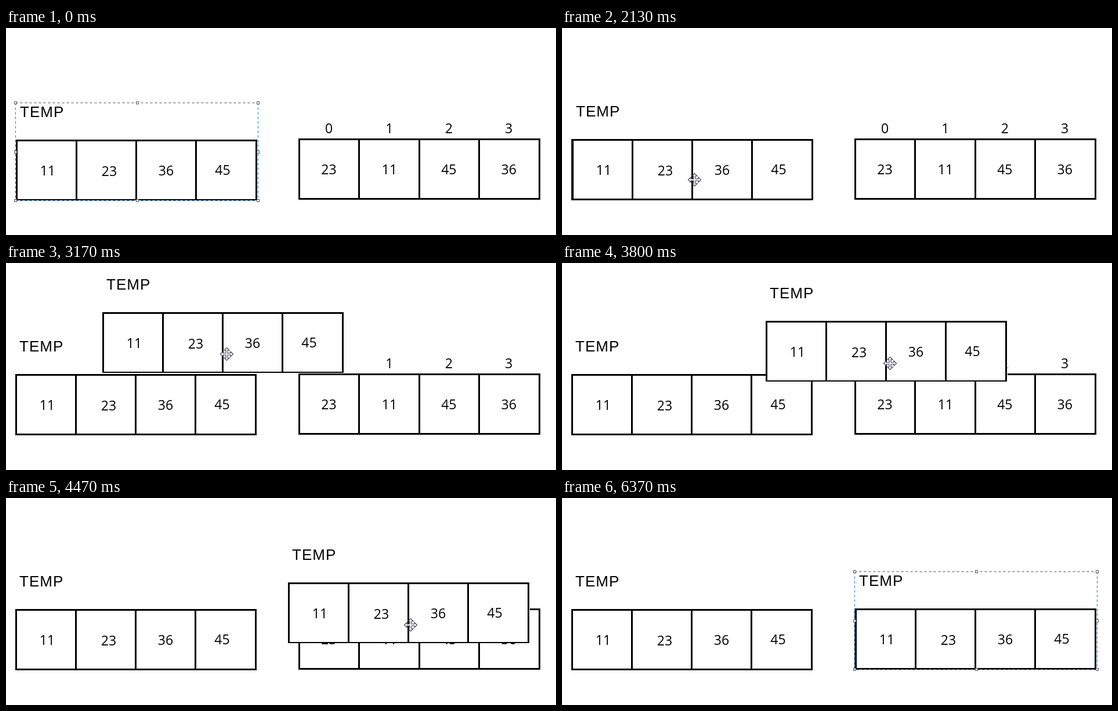
An HTML page with a canvas that plays this animation: 948 by 358 pixels, repeating every 6.41 s.

```html
<!DOCTYPE html>
<html lang="en">
<head>
<meta charset="utf-8">
<title>Array copy</title>
<style>
html, body { margin: 0; overflow: hidden; background: #fff; }
canvas { display: block; }
</style>
</head>
<body>
<canvas id="stage" width="948" height="358"></canvas>
<script>
const ctx = document.getElementById('stage').getContext('2d');
const LOOP = 6410, SELECT_OFF = 1970, DRAG = 2130, SELECT_ON = 6200;

// Waypoints: [time, x, y]
const blockPath = [
  [2130, 18, 193], [2770, 62, 113], [3170, 167, 86], [3430, 246, 86],
  [3800, 352, 101], [4100, 440, 120], [4470, 487, 147], [4770, 506, 172],
  [5030, 507, 181], [5430, 507, 188], [5730, 506, 192]
];
const enterPath = [[1060, 196, 372], [1270, 213, 268], [1530, 213, 268], [1970, 228, 265], [2130, 227, 264]];
const leavePath = [[6200, 715, 263], [6370, 718, 372]];

// Monotone cubic interpolation of one coordinate
function along(path, t, axis) {
  const last = path.length - 1;
  if (t <= path[0][0]) return path[0][axis];
  if (t >= path[last][0]) return path[last][axis];
  const i = path.findIndex(p => p[0] > t) - 1;
  const slope = k => (path[k + 1][axis] - path[k][axis]) / (path[k + 1][0] - path[k][0]);
  const tangent = k => {
    if (k === 0) return slope(0);
    if (k === last) return slope(last - 1);
    const a = slope(k - 1), b = slope(k);
    return a * b > 0 ? 2 * a * b / (a + b) : 0;
  };
  const h = path[i + 1][0] - path[i][0], u = (t - path[i][0]) / h, v = 1 - u;
  return path[i][axis] * v * v * (1 + 2 * u) + path[i + 1][axis] * u * u * (3 - 2 * u)
    + h * u * v * (tangent(i) * v - tangent(i + 1) * u);
}
const at = (path, t) => [Math.round(along(path, t, 1)), Math.round(along(path, t, 2))];

function grid(x, y, width, bottomWeight) {
  ctx.fillStyle = '#000';
  for (let i = 0; i < 5; i++) {
    ctx.fillRect(x - 1 + Math.floor(i * (width - 3) / 4), y - 1, 3, 103 + bottomWeight);
  }
  ctx.fillRect(x - 1, y - 1, width, 3);
  ctx.fillRect(x - 1, y + 102, width, bottomWeight);
}

function number(text, x, y) {
  ctx.font = '23px "Open Sans", sans-serif';
  ctx.textAlign = 'center';
  const nudge = /^1+$/.test(text) ? 1 : 0;
  ctx.fillText(text, x + nudge, y + 8);
}

function tempArray(x, y, bottomWeight) {
  ctx.fillStyle = '#fff';
  ctx.fillRect(x - 1, y - 64, 417, 168);
  grid(x, y, 416, bottomWeight);
  ctx.font = '26px "Liberation Sans", Arial, sans-serif';
  ctx.textAlign = 'left';
  ctx.letterSpacing = '1px';
  ctx.fillText('TEMP', x + 6, y - 40);
  ctx.letterSpacing = '0px';
  number('11', x + 53, y + 53);
  number('23', x + 160, y + 54);
  number('36', x + 258, y + 53);
  number('45', x + 355.5, y + 52);
}

function sortedArray() {
  grid(505, 192, 417, 3);
  ['23', '11', '45', '36'].forEach((value, i) => {
    const x = 556.5 + i * 103.4;
    number(String(i), x, 174);
    number(value, x, 245);
  });
}

function line(x1, y1, x2, y2, color) {
  ctx.strokeStyle = color;
  ctx.beginPath();
  ctx.moveTo(x1 + .5, y1 + .5);
  ctx.lineTo(x2 + .5, y2 + .5);
  ctx.stroke();
}

function selection(x, y) {
  const left = x - 2, top = y - 65, right = x + 416, bottom = y + 104;
  ctx.lineWidth = 1;
  ctx.setLineDash([4, 4]);
  line(left, top, right, top, '#555');
  line(left, top, left, bottom, '#0078d7');
  line(right, top, right, bottom, '#0078d7');
  line(left, bottom, right, bottom, '#0078d7');
  ctx.setLineDash([]);
  ctx.strokeStyle = '#555';
  ctx.fillStyle = '#fff';
  for (const hx of [left, left + 210, right]) {
    for (const hy of [top, top + 85, bottom]) {
      if (hx === left + 210 && hy === top + 85) continue;
      ctx.fillRect(hx - 2, hy - 2, 5, 5);
      ctx.strokeRect(hx - 1.5, hy - 1.5, 4, 4);
    }
  }
}

function moveCursor(x, y) {
  const arm = [[1.5, -1.5], [1.5, -6.5], [4.5, -6.5], [0, -11], [-4.5, -6.5], [-1.5, -6.5]];
  ctx.save();
  ctx.translate(x + .5, y + .5);
  ctx.beginPath();
  for (let k = 0; k < 4; k++) {
    for (const [px, py] of arm) ctx.lineTo(px, py);
    ctx.rotate(-Math.PI / 2);
  }
  ctx.closePath();
  ctx.fillStyle = '#fff';
  ctx.strokeStyle = '#3c3a4c';
  ctx.lineWidth = 1.1;
  ctx.fill();
  ctx.stroke();
  ctx.restore();
}

function cursorAt(t) {
  if (t < DRAG) return at(enterPath, t);
  if (t >= SELECT_ON) return at(leavePath, t);
  const [x, y] = at(blockPath, t + 13); // the pointer leads the block
  return [x + 209, y + 71];
}

function draw(t) {
  ctx.fillStyle = '#fff';
  ctx.fillRect(0, 0, 948, 358);
  ctx.fillStyle = '#000';
  sortedArray();
  if (t >= DRAG) tempArray(17, 193, 3);
  const [x, y] = t < DRAG ? [18, 194] : at(blockPath, t);
  tempArray(x, y, 2);
  if (t < SELECT_OFF || t >= SELECT_ON) selection(x, y);
  if (t >= 1100 && t < 6370) moveCursor(...cursorAt(t));
}

function tick() {
  draw(performance.now() % LOOP);
  requestAnimationFrame(tick);
}
tick();
</script>
</body>
</html>
```
